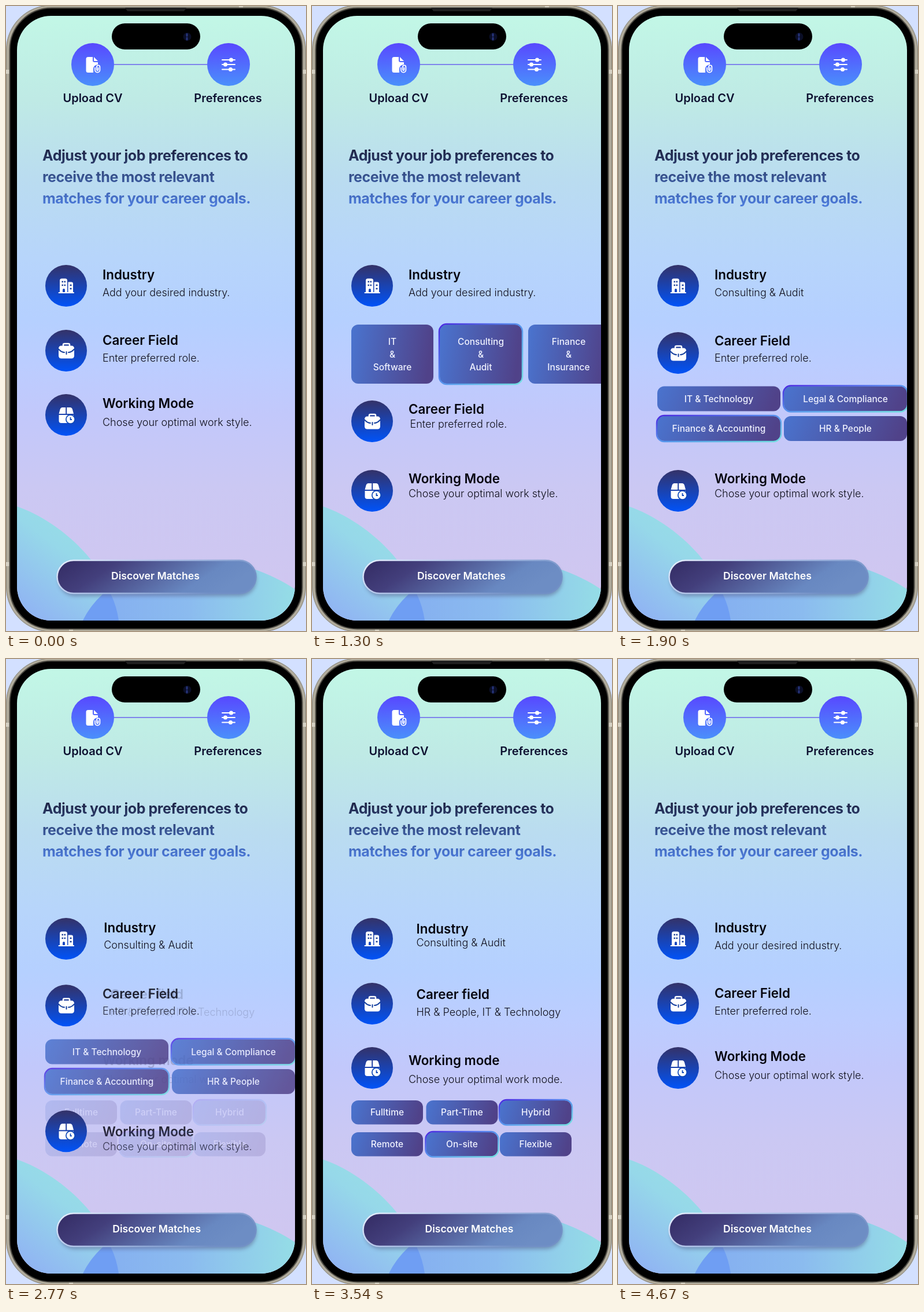
Recreate the animation shown at these times as an HTML page. Size 519 by 1079 pixels, loop 5.04 s.

```html
<!DOCTYPE html>
<html lang="en">
<head>
<meta charset="utf-8">
<title>Job preferences</title>
<style>
html, body { margin: 0; width: 100%; height: 100%; overflow: hidden; background: #d3e0ff; }
svg { display: block; width: 100vw; height: 100vh; }
text { font-family: Inter, "Open Sans", sans-serif; fill: #05050f; }
.step { font-size: 20px; font-weight: 600; text-anchor: middle; fill: #0d1030; }
.head { font-size: 25px; font-weight: 700; letter-spacing: -.45px; fill: url(#ink); }
.title { font-size: 22.4px; font-weight: 600; }
.sub { font-size: 18px; font-weight: 300; fill: #10101c; }
.chip { font-size: 15.5px; font-weight: 500; text-anchor: middle; fill: #f0f2ff; }
.button { font-size: 17.6px; font-weight: 600; fill: #fff; }
</style>
</head>
<body>
<svg id="stage" viewBox="0 0 519 1079" preserveAspectRatio="none">
  <defs>
    <linearGradient id="sky" x2="0" y2="1">
      <stop stop-color="#c2f7e6"/><stop offset=".14" stop-color="#bfeae5"/>
      <stop offset=".27" stop-color="#badcf0"/><stop offset=".4" stop-color="#b7d5fb"/>
      <stop offset=".5" stop-color="#b5d0ff"/><stop offset=".58" stop-color="#bccdff"/>
      <stop offset=".66" stop-color="#c2c8fb"/><stop offset=".78" stop-color="#cbc8f3"/>
      <stop offset="1" stop-color="#d1c6ef"/>
    </linearGradient>
    <linearGradient id="ink" gradientUnits="userSpaceOnUse" x1="0" y1="245" x2="0" y2="345">
      <stop stop-color="#1c2140"/><stop offset=".5" stop-color="#37528f"/><stop offset="1" stop-color="#4c7bdc"/>
    </linearGradient>
    <linearGradient id="violet" x2="0" y2="1"><stop stop-color="#5848ff"/><stop offset="1" stop-color="#4a90fb"/></linearGradient>
    <linearGradient id="navy" x2="0" y2="1"><stop stop-color="#343268"/><stop offset="1" stop-color="#0053f8"/></linearGradient>
    <linearGradient id="tile" y2=".1"><stop stop-color="#4a74cf"/><stop offset="1" stop-color="#504289"/></linearGradient>
    <linearGradient id="ring" y2="1"><stop stop-color="#4a26e0"/><stop offset=".5" stop-color="#5593ee"/><stop offset="1" stop-color="#70e2e0"/></linearGradient>
    <linearGradient id="press" y2=".25"><stop stop-color="#332b63"/><stop offset=".3" stop-color="#433f7c"/><stop offset=".82" stop-color="#6888c1"/><stop offset="1" stop-color="#6d8dc4"/></linearGradient>
    <linearGradient id="rim" y2=".4"><stop stop-color="#e8f1ff"/><stop offset=".4" stop-color="#b4c6ea"/><stop offset="1" stop-color="#7290c6"/></linearGradient>
    <linearGradient id="hillLeft" x1=".8" y1=".1" x2=".2" y2="1"><stop stop-color="#97e0e5"/><stop offset=".4" stop-color="#96d8e9"/><stop offset="1" stop-color="#90b4f3"/></linearGradient>
    <linearGradient id="hillRight"><stop offset=".15" stop-color="#86b1f0"/><stop offset=".5" stop-color="#8bbbef"/><stop offset="1" stop-color="#95dde6"/></linearGradient>
    <filter id="shade" x="-10%" y="-30%" width="120%" height="180%"><feGaussianBlur stdDeviation="3"/></filter>
    <clipPath id="glass"><rect x="19" y="17" width="481" height="1044" rx="59"/></clipPath>
  </defs>

  <!-- phone body -->
  <rect x=".5" y="-1" width="518" height="1081" rx="77" fill="#b0ab9c" stroke="#858174"/>
  <path d="M0 110h6v7h-6zM0 960h6v7h-6zM513 110h6v7h-6zM513 960h6v7h-6zM403 0h7v3h-7zM109 1076h7v3h-7z" fill="#d5d1c4"/>
  <rect x="6.500" y="3.500" width="506" height="1072" rx="72" stroke="#4a4841" stroke-width="2"/>
  <path d="M206 3H312L308 9H210Z" fill="#1f1f1f"/>

  <g clip-path="url(#glass)">
    <rect x="19" y="17" width="481" height="1044" fill="url(#sky)"/>
    <path d="M19 864C90 888 182 965 195 1061H19Z" fill="url(#hillLeft)"/>
    <path d="M133 1061C155 1012 230 957 330 956C400 956 460 980 500 1007V1061Z" fill="url(#hillRight)"/>
    <path d="M133 1061Q148 1030 177 1007Q191 1032 195 1061Z" fill="#6f9ef3"/>

    <path d="M187 101H348" stroke="#6a62ee" stroke-width="1.5"/>
    <circle cx="150" cy="101" r="37" fill="url(#violet)"/>
    <circle cx="385" cy="101" r="37" fill="url(#violet)"/>
    <path d="M142 88H150V94Q150 97 153 97H159V101Q151 102 151 109V115H142Q138.500 115 138.500 111.500V91.500Q138.500 88 142 88ZM152 88L159 95H153Q152 95 152 94Z" fill="#fff"/>
    <path d="M154 106V110.500A4.200 4.200 0 0 0 162.400 110.500V105A2.700 2.700 0 0 0 157 105V110A1.200 1.200 0 0 0 159.500 110V106" fill="none" stroke="#fff" stroke-width="1.800"/>
    <path d="M374 93H396M374 101H396M374 109.500H396" stroke="#fff" stroke-width="2" stroke-linecap="round"/>
    <g fill="#fff"><circle cx="389.500" cy="93" r="3.500"/><circle cx="379.500" cy="101" r="3.500"/><circle cx="388.500" cy="109.500" r="3.500"/></g>
    <text class="step" x="150" y="166">Upload CV</text>
    <text class="step" x="384" y="166">Preferences</text>

    <text class="head" x="63" y="267">Adjust your job preferences to</text>
    <text class="head" x="63" y="304">receive the most relevant</text>
    <text class="head" x="63" y="341">matches for your career goals.</text>

    <rect x="91" y="962" width="342" height="57" rx="28" fill="#5a6490" opacity=".55" filter="url(#shade)"/>
    <rect x="88.500" y="957" width="344" height="57" rx="28.500" fill="url(#press)" stroke="url(#rim)" stroke-width="2.500"/>

    <g id="live"></g>
  </g>

  <rect x="183" y="30" width="153" height="45" rx="22.500"/>
  <circle cx="313.500" cy="53" r="7" fill="#0a0e26"/>
  <path d="M313 48.500v3M313 55v3" stroke="#27357c" stroke-width="3" stroke-linecap="round"/>
</svg>

<script>
const live = document.getElementById('live');
const parts = [];

// keys: one [x, y] per screen, or 0 where the part is hidden
function part(markup, keys) {
  const g = document.createElementNS('http://www.w3.org/2000/svg', 'g');
  g.innerHTML = markup;
  live.append(g);
  parts.push({ g, keys });
}

const text = (cls, words, x = 0, y = 0) =>
  `<text class="${cls}" x="${x}" y="${y}">${words.replace(/&/g, '&amp;')}</text>`;
const label = (cls, words, ...keys) => part(text(cls, words), keys);

function chip(words, x, y, w, h, picked) {
  const lines = words.split('|');
  const top = y + h / 2 + 5.5 - (lines.length - 1) * 11;
  const ring = picked
    ? `<rect x="${x - 1}" y="${y - 1}" width="${w + 2}" height="${h + 2}" rx="13" fill="none" stroke="url(#ring)" stroke-width="2.500"/>`
    : '';
  return `<rect x="${x}" y="${y}" width="${w}" height="${h}" rx="12" fill="url(#tile)"/>` + ring +
    lines.map((line, i) => text('chip', line, x + w / 2, top + i * 22)).join('');
}

const icon = (glyph, ...ys) =>
  part(`<circle r="36" fill="url(#navy)"/>${glyph}`, ys.map(y => [104, y]));

label('title', 'Industry', [167, 472], [167, 472], [167, 472], [180.5, 474]);
label('sub', 'Add your desired industry.', [167, 501], [167, 501], 0, 0);
label('sub', 'Consulting & Audit', 0, 0, [167, 501], [180.5, 496]);
label('title', 'Career Field', [167, 584.5], [167, 703.5], [167, 586], 0);
label('sub', 'Enter preferred role.', [167, 614], [169.5, 727.5], [167, 614], 0);
label('title', 'Career field', 0, 0, 0, [180.5, 587]);
label('sub', 'HR & People, IT & Technology', 0, 0, 0, [180.5, 616]);
label('title', 'Working Mode', [167, 694], [167, 824], [167, 824], 0);
label('sub', 'Chose your optimal work style.', [167, 725], [167, 848], [167, 848], 0);
label('title', 'Working mode', 0, 0, 0, [167, 701]);
label('sub', 'Chose your optimal work mode.', 0, 0, 0, [167, 731.5]);
label('button', 'Discover Matches', [182, 990], [182, 990], [182, 990], [195.5, 990]);

part(chip('IT|&|Software', 68, 550, 142, 102) +
  chip('Consulting|&|Audit', 221, 550, 142, 102, true) +
  chip('Finance|&|Insurance', 374, 550, 140, 102), [0, [0, 0], 0, 0]);
part(chip('IT & Technology', 68, 656.5, 213, 43) +
  chip('Legal & Compliance', 287, 656.5, 213, 43, true) +
  chip('Finance & Accounting', 68, 708, 213, 43, true) +
  chip('HR & People', 287, 708, 213, 43), [0, 0, [0, 0], 0]);
part(['Fulltime', 'Part-Time', 'Hybrid', 'Remote', 'On-site', 'Flexible'].map((word, i) =>
  chip(word, [68, 197.5, 325][i % 3], i < 3 ? 762 : 817, 124, 41.5, i == 2 || i == 4)).join(''),
  [0, 0, 0, [0, 0]]);

icon(`<path d="M-11 12V-9Q-11 -12.500 -7.500 -12.500H-1.500Q2 -12.500 2 -9V12H-2V7Q-2 5 -4 5T-6 7V12ZM3.500 12V-6.500H9Q12 -6.500 12 -3.500V12Z" fill="#fff"/>
  <path d="M-12.500 12H13" stroke="#fff" stroke-width="2" stroke-linecap="round"/>
  <path d="M-7.500 -7h2.500M-3.500 -7h2.500M-7.500 -1h2.500M-3.500 -1h2.500M6.500 -1h3M6.500 5h3" stroke="#1d4099" stroke-width="2.500"/>`,
  483, 483, 483, 483);
icon(`<path d="M-5 -8V-10Q-5 -12 -3 -12H4Q6 -12 6 -10V-8" fill="none" stroke="#fff" stroke-width="2.500"/>
  <rect x="-13" y="-8.500" width="27" height="22" rx="4.500" fill="#fff"/>
  <path d="M-13 -2.500Q-8 3 -3 3M14 -2.500Q9 3 4 3M.5 2v4" fill="none" stroke="#16419f" stroke-width="2" stroke-linecap="round"/>`,
  595, 717, 599, 595);
icon(`<path d="M-12.500 -2L-10.500 -9.500Q-9.500 -13 -6.500 -13H-.8V-2ZM1.200 -2V-13H7Q10 -13 11 -9.500L13 -2ZM-12.500 0H13V14H-8.500Q-12.500 14 -12.500 10Z" fill="#fff"/>
  <circle cx="7.500" cy="7.500" r="8.500" fill="#114ab8"/><circle cx="7.500" cy="7.500" r="6.800" fill="#fff"/>
  <path d="M7.500 4V8H10" fill="none" stroke="#114ab8" stroke-width="1.800"/>`,
  706, 837, 837, 706);

const LOOP = 5040, STEP = 85;
const starts = [610, 1640, 2770, 3890];
const leads = [80, 4, 28, 42];   // time already run when each change first shows

function draw(now) {
  const t = now % LOOP;
  const k = starts.findLastIndex(s => t >= s);
  const from = Math.max(k, 0), to = (k + 1) % 4;
  let p = 1;
  if (k >= 0) {
    // critically damped spring, sampled in steps
    const x = .026 * (leads[k] + Math.floor((t - starts[k] + 5) / STEP) * STEP);
    p = x > 6 ? 1 : 1 - (1 + x) * Math.exp(-x);
  }
  for (const { g, keys } of parts) {
    const a = keys[from], b = keys[to];
    const [x0, y0] = a || b || [0, 0], [x1, y1] = b || a || [0, 0];
    g.setAttribute('opacity', (a ? 1 - p : 0) + (b ? p : 0));
    g.setAttribute('transform', `translate(${x0 + (x1 - x0) * p} ${y0 + (y1 - y0) * p})`);
  }
  requestAnimationFrame(draw);
}
draw(performance.now());
</script>
</body>
</html>
```
